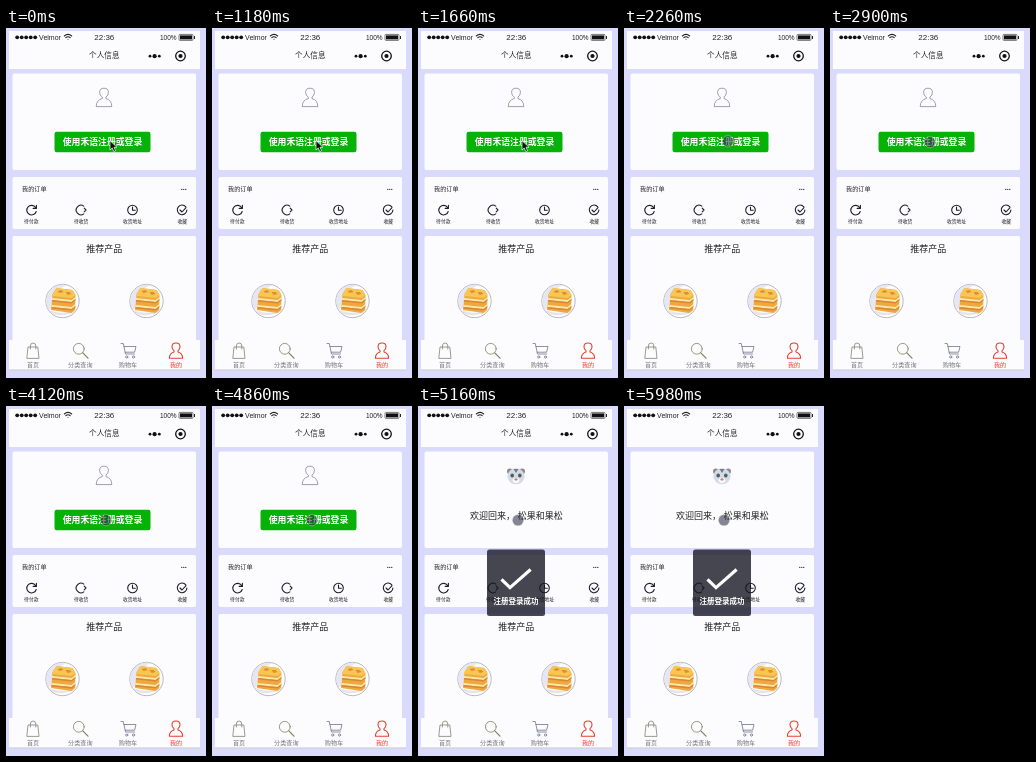
These frames come from a looping animation (200x350 px, 6 s). An HTML page:

```html
<!DOCTYPE html>
<html lang="zh-CN">
<head>
<meta charset="utf-8">
<title>个人信息</title>
<style>
html, body { margin: 0; width: 100%; height: 100%; overflow: hidden; background: #dadafc; }
svg { display: block; width: 200px; height: 350px; }
text { font-family: "Noto Sans CJK SC", "Noto Sans CJK", "Noto Sans", sans-serif; }
.latin { font-family: "Liberation Sans", Inter, sans-serif; }
.line { fill: none; stroke-linecap: round; stroke-linejoin: round; }
</style>
</head>
<body>
<svg id="stage" viewBox="0 0 200 350">
  <defs>
    <clipPath id="round"><circle r="16.2"/></clipPath>
    <g id="cake">
      <circle r="16.7" fill="#fdfdfd" stroke="#8d8d94" stroke-width=".6"/>
      <g clip-path="url(#round)">
        <path d="M-17-17H6L-9-9L-12 8H-17Z" fill="#e6e6f4"/>
        <path d="M-15 8Q0 16 15 7L12 11Q0 17-12 12Z" fill="#e4e4ea"/>
        <path d="M-10-7L-6-13L10-11L13-6L12.5 9L9 12L-11.5 9Z" fill="#efa83f"/>
        <path d="M-10-7L-6-13L10-11L13-6L9-3L-10-5Z" fill="#f7c653"/>
        <path d="M-10.5-3L9-1L13-4V-2L9 1L-10.5-1ZM-11 4L9 6L13 3V5L9 8L-11 6Z" fill="#fde8a8"/>
        <path d="M-10.5-1L9 1L13-2V-.5L9 2.4L-10.5.4ZM-11 6L9 8L13 5V6.5L9 9.4L-11 7.4Z" fill="#d98732"/>
        <path d="M-5-10L-1-11L1-9L-3-8ZM3-9L7-9L9-7L5-6Z" fill="#e28d35"/>
      </g>
    </g>
  </defs>

  <g fill="#fcfcff">
    <rect x="3" y="3" width="191" height="38"/>
    <rect x="6.5" y="45.5" width="183.5" height="96.5" rx="2"/>
    <rect x="6.5" y="149" width="183.5" height="52" rx="2"/>
    <rect x="6.5" y="208" width="183.5" height="110" rx="2"/>
    <rect x="3" y="312" width="191" height="29.5"/>
  </g>
  <path d="M3 342H194" stroke="#cdd1c2" stroke-width=".8"/>

  <g id="dots" fill="#111"></g>
  <g class="line" stroke="#222" stroke-width="1.1">
    <path d="M58.3 8Q62 4.7 65.7 8M59.8 9.7Q62 7.8 64.2 9.7"/>
    <circle cx="62" cy="11.3" r=".5" fill="#222" stroke="none"/>
  </g>
  <rect x="173" y="6.4" width="14" height="6" rx="1" fill="none" stroke="#222" stroke-width=".6"/>
  <rect x="174" y="7.4" width="12" height="4" fill="#111"/>
  <path d="M188.5 8V11" stroke="#222" stroke-width="1"/>
  <circle cx="174.5" cy="28" r="4.8" fill="none" stroke="#111" stroke-width="1.3"/>
  <circle cx="174.5" cy="28" r="2.1" fill="#111"/>

  <g class="line" stroke="#1d1d2b" stroke-width="1.1">
    <path d="M29.6 179.5A4.8 4.8 0 1 0 30.2 183.5M30.4 177.3V180.4H27.2"/>
    <path d="M77.8 178.1A4.8 4.8 0 1 0 77.8 185.9M78.2 180.2L80 182L78.2 183.8"/>
    <circle cx="126.5" cy="182" r="4.8"/><path d="M126.5 179V182.3H129.3"/>
    <path d="M179.8 178.8A4.8 4.8 0 1 0 180.9 182M174 182L176 184L180 179.7"/>
  </g>

  <use href="#cake" x="56.5" y="273"/>
  <use href="#cake" x="140.5" y="273"/>

  <g class="line" stroke-width=".8">
    <path d="M22.4 319H31.8L33 330.4H21.2ZM24.4 321V318Q24.4 315 27.1 315T29.8 318V321" stroke="#83836f"/>
    <g stroke="#80805f"><circle cx="72.8" cy="320.8" r="5.4"/><path d="M76.8 324.8L82 330.2" stroke-width="1.2"/></g>
    <g stroke="#74748f"><path d="M115 315.5H117.3L119.5 326H128.5M118 318.5H130L128.6 324.2H119.2"/><circle cx="120.7" cy="329" r="1.1"/><circle cx="127.5" cy="329" r="1.1"/></g>
    <path d="M168 322.6Q166 321.2 166 318.8Q166 315 170 315T174 318.8Q174 321.2 172 322.6V324Q176.6 325.3 176.6 330.3H163.4Q163.4 325.3 168 324Z" stroke="#e5402d" stroke-width="1.1"/>
  </g>
  <g id="labels"></g>

  <g id="guest">
    <path class="line" d="M96 69Q93.6 67.4 93.6 64.4Q93.6 60.2 98 60.2T102.4 64.4Q102.4 67.4 100 69V70.6Q105.8 72.2 105.8 78.6H90.2Q90.2 72.2 96 70.6Z" stroke="#77778a" stroke-width=".7"/>
    <rect x="48.5" y="103.7" width="96" height="20.6" rx="2.2" fill="#06b108"/>
  </g>

  <g id="member">
    <circle cx="91.8" cy="65.4" r="2.8" fill="#8d8a96"/>
    <circle cx="104.2" cy="65.4" r="2.8" fill="#8d8a96"/>
    <ellipse cx="98" cy="70.3" rx="8.6" ry="8" fill="#d6dae2"/>
    <path d="M95.5 63H100.5L98 67Z" fill="#77798c"/>
    <ellipse cx="94.2" cy="69.6" rx="1.8" ry="2" fill="#46606c"/>
    <ellipse cx="101.8" cy="69.6" rx="1.8" ry="2" fill="#46606c"/>
    <ellipse cx="98" cy="74.3" rx="3.4" ry="2.6" fill="#fbfbff"/>
    <ellipse cx="98" cy="73.4" rx="1.6" ry="1.2" fill="#c97f86"/>
  </g>

  <path id="arrow" d="M104 112.6V122L106.2 120L107.8 123.6L109.6 122.7L108 119.3H111Z" fill="#111" stroke="#fff" stroke-width=".7"/>
  <circle id="touch" r="5.6" fill="#28283f" fill-opacity=".56" stroke="#e4e8e4" stroke-opacity=".5" stroke-width=".8"/>

  <g id="toast">
    <rect x="69" y="143.5" width="58" height="66.5" rx="2.5" fill="#14141f" fill-opacity=".78"/>
    <path d="M83.5 173.3L92 181.6L112.6 163.5" fill="none" stroke="#fff" stroke-width="3.2"/>
  </g>
</svg>
<script>
const $ = id => document.getElementById(id);

function add(parent, tag, attrs, content = "") {
  const node = document.createElementNS("http://www.w3.org/2000/svg", tag);
  for (const key in attrs) node.setAttribute(key, attrs[key]);
  node.textContent = content;
  $(parent).append(node);
}

// y is the middle of the line
function label(content, x, y, size, fill = "#222", extra = {}, parent = "labels") {
  add(parent, "text", { x, y: y + size * 0.37, "font-size": size, fill, "text-anchor": "middle", ...extra }, content);
}

function dots(xs, y, radius) {
  xs.forEach(cx => add("dots", "circle", { cx, cy: y, r: radius }));
}

dots([11.2, 15.7, 20.2, 24.7, 29.2], 9.3, 1.9);
dots([144, 153.3], 28.2, 1.4);
dots([148.6], 28.2, 2.1);
dots([175.8, 177.8, 179.8], 161.3, 0.65);

const latin = { class: "latin" };
label("Velmor", 44, 9, 7, "#222", latin);
label("22:36", 98.3, 9, 8, "#222", latin);
label("100%", 162.3, 9.3, 6.5, "#222", latin);
label("个人信息", 98.3, 27.5, 7.6);
label("我的订单", 28.3, 161, 6.1);
label("推荐产品", 98.3, 220.5, 9);

[["待付款", 25.3], ["待收货", 75.2], ["收货地址", 126.5], ["收藏", 176.3]]
  .forEach(([name, x]) => label(name, x, 193, 4.8));
[["首页", 27], ["分类查询", 74.3], ["购物车", 122], ["我的", 170, "#e5402d"]]
  .forEach(([name, x, color = "#73737a"]) => label(name, x, 336.7, 6.1, color));

const bold = { "font-weight": 700 };
label("使用禾语注册或登录", 96.5, 114, 8.85, "#fff", bold, "guest");
label("欢迎回来，", 52, 110, 9, "#222", { "text-anchor": "start" }, "member");
label("松果和果松", 99.7, 110, 9, "#222", { "text-anchor": "start" }, "member");
label("注册登录成功", 98, 195, 7.5, "#fff", bold, "toast");

const LOOP = 6000, HOVER = 2100, LOGIN = 5040;
const ramp = (t, from, to) => Math.min(1, Math.max(0, (t - from) / (to - from)));
const show = (id, on) => $(id).setAttribute("visibility", on ? "visible" : "hidden");

function draw(now) {
  const t = now % LOOP;
  const move = ramp(t, 2260, 2640);
  const eased = move * move * (3 - 2 * move);
  show("arrow", t < HOVER);
  show("touch", t >= HOVER);
  $("touch").setAttribute("transform", `translate(${104 - 4 * eased} ${113.3 + 0.9 * eased})`);
  show("guest", t < LOGIN);
  show("member", t >= LOGIN);
  $("toast").setAttribute("opacity", ramp(t, LOGIN, LOGIN + 100));
}

const start = performance.now();
function tick() {
  draw(performance.now() - start);
  requestAnimationFrame(tick);
}
tick();
</script>
</body>
</html>
```
